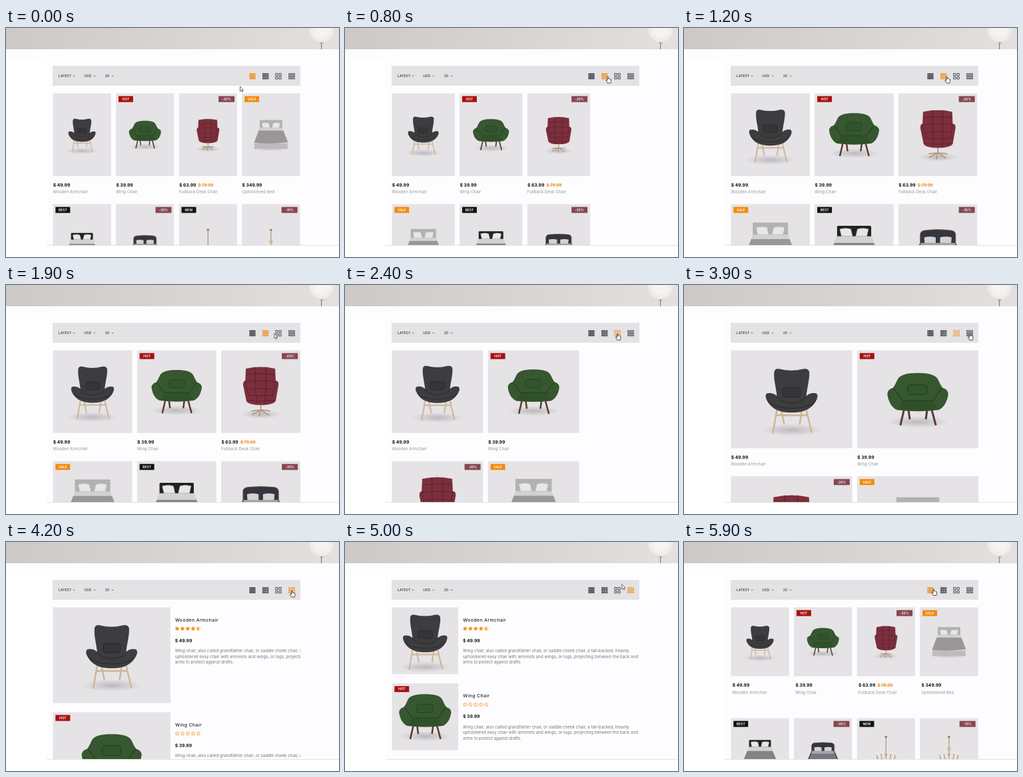
These frames come from a looping animation (500 px wide and 345 px high, 6000 ms). An HTML page:

```html
<!DOCTYPE html>
<html lang="en">
<head>
<meta charset="utf-8">
<title>Shop grid views</title>
<style>
html, body { margin: 0; width: 100%; height: 100%; overflow: hidden; background: #fdfcfe; }
svg { display: block; }
#stage { width: 500px; height: 345px; font-family: Inter, "Open Sans", sans-serif; }
.price { font-size: 6.7px; font-weight: 700; fill: #111; }
.old { font-size: 6.2px; font-weight: 600; fill: #f08a1c; text-decoration: line-through; }
.name { font-size: 5.8px; letter-spacing: .2px; fill: #929094; }
.title { font-size: 6.8px; letter-spacing: .42px; font-weight: 500; fill: #222; }
.desc { font-size: 6.2px; fill: #77757a; }
.tag { font-size: 5px; font-weight: 600; fill: #fff; text-anchor: middle; }
.tool { font-size: 5px; letter-spacing: .1px; font-weight: 500; fill: #333; }
</style>
</head>
<body>
<svg id="stage" viewBox="0 0 500 345">
  <defs>
    <linearGradient id="wall">
      <stop offset="0" stop-color="#cec9c6"/><stop offset=".5" stop-color="#d8d4d1"/><stop offset="1" stop-color="#e3e0de"/>
    </linearGradient>
    <radialGradient id="globe"><stop offset=".5" stop-color="#f6f4f2"/><stop offset="1" stop-color="#ebe8e6"/></radialGradient>
    <radialGradient id="soft"><stop offset="0" stop-color="#77757a" stop-opacity=".38"/><stop offset="1" stop-color="#77757a" stop-opacity="0"/></radialGradient>
    <clipPath id="view"><rect x="62" y="88" width="380.5" height="239.5"/></clipPath>

    <g id="armchair">
      <ellipse cx="0" cy="46" rx="46" ry="9" fill="url(#soft)"/>
      <path d="M-22 16L-28 51M22 16L30 50M-15 18L-11 38M15 18L12 38M-23 24H23" fill="none" stroke="#cfb593" stroke-width="2.4"/>
      <path d="M-26 -41Q-25 -47 -18 -45.5Q0 -41 17 -45.5Q25 -47 26.5 -41C27 -29 23 -17 22 -5Q28 -11 37 -9Q41 -5 36 3C30 14 19 20 0 20S-30 14 -36 3Q-41 -5 -37 -9Q-28 -11 -22 -5C-23 -17 -27 -29 -26 -41Z" fill="#3d3d40"/>
      <path d="M-22 -5C-17 9 17 9 22 -5M-36 2C-26 17 26 17 36 2" fill="none" stroke="#2b2b2d" stroke-width="1.2"/>
      <rect x="-13" y="-18" width="26" height="14.5" rx="4" fill="#353538" stroke="#262628" stroke-width=".8"/>
    </g>
    <g id="green">
      <ellipse cx="0" cy="34" rx="46" ry="9" fill="url(#soft)"/>
      <path d="M-20 13L-26 39M20 13L27 39M-14 15L-12 30M14 15L12 30" stroke="#5d3a2e" stroke-width="3" fill="none"/>
      <path d="M-31 -28C-28 -37 -16 -39.5 0 -39.5S28 -37 31 -28Q34 -21 37 -17Q45 -15 45.5 -8C44 4 39 12 31 16Q0 20 -31 16C-39 12 -44 4 -45.5 -8Q-45 -15 -37 -17Q-34 -21 -31 -28Z" fill="#36572f"/>
      <path d="M-37 -17C-29 -9 -26 -3 -23 2H23C26 -3 29 -9 37 -17" fill="none" stroke="#27451f" stroke-width="1.5"/>
      <path d="M-23 3H23L29 15Q0 19 -29 15Z" fill="#2f5029"/>
      <rect x="-15" y="-22" width="29" height="15" rx="5" fill="#31542c" stroke="#223d1e"/>
    </g>
    <g id="red">
      <ellipse cx="0" cy="41" rx="36" ry="8" fill="url(#soft)"/>
      <path d="M0 22V33L-16 42M0 33L15 43M0 33L-3 45M0 33L17 35M0 33L-17 35" fill="none" stroke="#b69879" stroke-width="2.2"/>
      <path d="M-27 -42Q0 -48 26 -42L27 -20Q33 -20 32 -12L27 17Q22 24 0 24T-26 17L-32 -12Q-32 -20 -28 -20Z" fill="#7c2f3c"/>
      <path d="M-10 -45L-9 8M9 -45L9 8M-27 -31Q0 -35 26 -31M-28 -18Q0 -22 27 -18M-22 -4Q0 -8 22 -4M-28 -19L-22 7H22L27 -19M-8 8V23M8 8V23M-25 16Q0 18 25 16" fill="none" stroke="#5d1f2b" stroke-width="1.1"/>
    </g>
    <g id="sheets">
      <ellipse cx="0" cy="38" rx="56" ry="9" fill="url(#soft)"/>
      <path d="M-31 -18H31L47 22V40H-47V22Z" fill="#d9d8d9"/>
      <path d="M-47 25H47V40H-47Z" fill="#bdbbbd"/>
      <path d="M-32 -20H32L36 -9H-36Z" fill="#d3d1d1"/>
      <path d="M-26 -33Q-15 -36 -6 -33L-3 -20H-23ZM26 -33Q15 -36 6 -33L3 -20H23Z" fill="#e8e7e8" stroke="#bab8ba" stroke-width=".7"/>
    </g>
    <g id="greybed">
      <rect x="-32" y="-42" width="64" height="30" fill="#b3b1b1"/>
      <use href="#sheets"/>
      <path d="M-35 -12H35L48 21Q0 28 -48 23Z" fill="#9a9796"/>
    </g>
    <g id="blackbed">
      <rect x="-31" y="-36" width="62" height="26" rx="2" fill="#222225"/>
      <use href="#sheets" y="3"/>
      <path d="M-36 -5H36L48 24Q0 31 -48 24Z" fill="#858388"/>
    </g>
    <g id="navybed">
      <path d="M-32 0V-21Q-31 -28 -20 -28Q0 -30 20 -28Q31 -28 32 -21V0Z" fill="#35353f" stroke="#6b4a42" stroke-width="1.3"/>
      <path d="M-33 -4H33L46 25V38H-46V25Z" fill="#46454f"/>
      <path d="M-25 -15Q-14 -18 -4 -15V-4H-24ZM25 -15Q14 -18 4 -15V-4H24Z" fill="#d2d1d4"/>
      <path d="M-31 -5H31L33 3H-33Z" fill="#a5a3a9"/>
      <path d="M-33 3H33L44 25H-44Z" fill="#77757d"/>
    </g>
    <g id="lamp">
      <path d="M0 -47V30" stroke="#a98b60" stroke-width="2"/>
      <path d="M-4 -47H4L2 -42H-2Z" fill="#8f744d"/>
      <path d="M0 24C-12 30 -26 22 -26 6M0 24C12 30 26 22 26 6M0 20C-8 25 -14 16 -14 3M0 20C8 25 14 16 14 3" fill="none" stroke="#ad8f62" stroke-width="2"/>
      <path d="M-26 6V-4M-14 3V-7M14 3V-7M26 6V-4" stroke="#f3ead8" stroke-width="4"/>
      <path d="M-26 12V24M-14 16V30M0 28V40M14 16V30M26 12V24" stroke="#b9b3aa" stroke-width="2" stroke-dasharray="2 1.5"/>
      <circle cy="6" r="4" fill="#c7ab7c"/>
    </g>
    <g id="glow"><use href="#lamp"/><circle cy="-11" r="5" fill="#d2b98c"/></g>
  </defs>

  <rect width="500" height="345" fill="#fdfcfe"/>
  <rect width="500" height="32" fill="url(#wall)"/>
  <circle cx="474" cy="3" r="18.5" fill="url(#globe)"/>
  <path d="M471 21.5H477L475.5 24H472.5Z" fill="#b9b2ab"/>
  <path d="M473.6 23V32" stroke="#77706b"/>
  <path d="M0 50H55Q61 50 61 56V345H0Z" fill="#fff"/>
  <rect x="61" y="327.5" width="439" height="18" fill="#fff"/>
  <rect x="70" y="57" width="372" height="30" fill="#e4e2e4"/>
  <g id="tools"></g>
  <g id="icons"></g>
  <g id="cards" clip-path="url(#view)"></g>
  <path d="M61 327.5H500" stroke="#e2e1e4"/>
  <g id="cursor">
    <path id="arrow" d="M0 0V7.4L1.7 5.9L2.9 8.4L4 7.9L2.9 5.5H5.1Z" fill="#fff" stroke="#333" stroke-width=".7"/>
    <path id="hand" d="M0 .8Q.8 -.4 1.4 .8V3.4Q2.4 2.8 2.9 3.7Q3.9 3.2 4.3 4.1Q5.5 3.8 5.5 5.2V7.4L4.6 10H.4L-1.9 6.4Q-2.1 5 -.9 5.3L0 6.2Z" fill="#fff" stroke="#222" stroke-width=".8"/>
  </g>
</svg>
<script>
const NS = "http://www.w3.org/2000/svg";
const $ = id => document.getElementById(id);
const RED = "#a80f10", WINE = "#86464f", ORANGE = "#f28a0e", BLACK = "#111", DARK = "#2c3038";
const LEFT = 70, TOP = 98, GAP = 7, WIDE = 379.5, SPEED = 600, LOOP = 6000;
const CLICK = { three: 700, two: 2283, list: 4150, four: 5825 };

function add(parent, tag, attrs = {}, text) {
  const el = document.createElementNS(NS, tag);
  set(el, attrs);
  if (text) el.textContent = text;
  parent.appendChild(el);
  return el;
}
function set(el, attrs) {
  for (const k in attrs) el.setAttribute(k, attrs[k]);
}
const show = (el, on) => el.setAttribute("display", on ? "inline" : "none");
const mix = (a, b, p) => a + (b - a) * p;

// cubic-bezier(.25, .1, .25, 1)
function ease(p) {
  if (p <= 0) return 0;
  if (p >= 1) return 1;
  let lo = 0, hi = 1, u;
  for (let i = 0; i < 20; i++) {
    u = (lo + hi) / 2;
    const x = .75 * u * (1 - u) + u ** 3;
    if (x < p) lo = u; else hi = u;
  }
  return .3 * u * (1 - u) ** 2 + 3 * u * u * (1 - u) + u ** 3;
}

// Toolbar
for (const [x, label, arrow] of [[79, "LATEST", 102], [117.3, "USD", 133], [148.7, "20", 160]]) {
  add($("tools"), "text", { x, y: 74, class: "tool" }, label);
  add($("tools"), "path", { d: `M${arrow - 1.3} 71.7l1.3 1.3l1.3 -1.3`, fill: "none", stroke: "#555", "stroke-width": .8 });
}
function gridPath(cx, n, size, step) {
  const start = -(step * (n - 1) + size) / 2;
  let d = "";
  for (let r = 0; r < n; r++)
    for (let c = 0; c < n; c++)
      d += `M${cx + start + c * step} ${72.7 + start + r * step}h${size}v${size}h${-size}z`;
  return d;
}
const bars = [0, 1, 2].map(i => `M424.5 ${68.7 + i * 3.2}h9v1.6h-9z`).join("");
const icons = [
  [gridPath(370, 4, 1.5, 2.3), .5], [gridPath(389.7, 3, 2, 3.2), .9],
  [gridPath(409, 2, 3.3, 5.2), .8], [bars, .8]
].map(([d, w]) => add($("icons"), "path", { d, "stroke-width": w }));

// Products
const TEXT = [
  "Wing chair, also called grandfather chair, or saddle cheek chair, a tall-backed, heavily",
  "upholstered easy chair with armrests and wings, or lugs, projecting between the back and",
  "arms to protect against drafts."
];
const goods = [
  { art: "armchair", name: "Wooden Armchair", price: "$ 49.99", stars: 4.5 },
  { art: "green", name: "Wing Chair", price: "$ 39.99", tag: "HOT", fill: RED, stars: 0 },
  { art: "red", name: "Fullback Desk Chair", price: "$ 63.99", old: "$ 79.99", tag: "-20%", fill: WINE },
  { art: "greybed", name: "Upholstered Bed", price: "$ 349.99", tag: "SALE", fill: ORANGE },
  { art: "blackbed", tag: "BEST", fill: BLACK },
  { art: "navybed", tag: "-35%", fill: WINE },
  { art: "lamp", tag: "NEW", fill: BLACK },
  { art: "glow", tag: "-15%", fill: WINE }
];
function starPath(cx, cy, half) {
  const pts = [];
  for (let i = 0; i <= (half ? 5 : 9); i++) {
    const r = i % 2 ? 1.4 : 3.2, a = -Math.PI / 2 - i * Math.PI / 5;
    pts.push(`${(cx + r * Math.cos(a)).toFixed(2)} ${(cy + r * Math.sin(a)).toFixed(2)}`);
  }
  return `M${pts.join("L")}Z`;
}
const cards = goods.map(g => {
  const root = add($("cards"), "g");
  const pic = add(root, "svg", { overflow: "hidden" });
  add(pic, "rect", { width: "100%", height: "100%", fill: "#e5e3e6" });
  const art = add(pic, "use", { href: "#" + g.art });

  const tag = add(root, "g");
  const right = g.tag && g.tag[0] === "-", tw = right ? 24 : 22;
  if (g.tag) {
    add(tag, "rect", { width: tw, height: 9, fill: g.fill });
    add(tag, "text", { x: tw / 2, y: 6.3, class: "tag" }, g.tag);
  }

  const info = add(root, "g");
  if (g.name) {
    add(info, "text", { x: .5, y: 15.6, class: "price" }, g.price);
    if (g.old) add(info, "text", { x: 29, y: 15.5, class: "old" }, g.old);
    add(info, "text", { x: .3, y: 26.1, class: "name" }, g.name);
  }

  const row = add(root, "g");
  if ("stars" in g) {
    add(row, "text", { x: 7, y: 21.4, class: "title" }, g.name);
    for (let i = 0; i < 5; i++) {
      const x = 10 + i * 8, left = g.stars - i;
      add(row, "path", { d: starPath(x, 32.3), fill: left >= 1 ? ORANGE : "none", stroke: ORANGE, "stroke-width": .6 });
      if (left === .5) add(row, "path", { d: starPath(x, 32.3, true), fill: ORANGE });
    }
    add(row, "text", { x: 6.8, y: 52.3, class: "price" }, g.price);
    TEXT.forEach((line, i) => add(row, "text", { x: 6.8, y: 67.8 + i * 8.7, class: "desc" }, line));
  }
  return { root, pic, art, tag, info, row, right, tw };
});

function layout(t) {
  const since = at => ease((t - at) / SPEED);
  const s = { active: 0, w: 87.6, h: 125, zoom: .53, shift: 0, list: false };
  if (t >= CLICK.four) {
    const p = since(CLICK.four);
    s.h = mix(101, 125, p);
    s.shift = 2.3 * (1 - p);
  } else if (t >= CLICK.list) {
    const p = since(CLICK.list);
    Object.assign(s, { active: 3, list: true, w: mix(182.5, 100, p), h: mix(147.8, 101, p), zoom: mix(1, .86, p) });
  } else if (t >= CLICK.two) {
    s.active = 2;
    s.w = mix(119.3, 182.5, since(CLICK.two));
    s.h = Math.max(125, s.w / 1.235);
    s.zoom = s.h / 147;
  } else if (t >= CLICK.three) {
    const p = since(CLICK.three);
    Object.assign(s, { active: 1, w: mix(87.6, 119.3, p), zoom: mix(.53, .83, p) });
  }
  s.cols = s.list ? 1 : Math.floor(WIDE / (s.w + GAP));
  s.pitch = s.list ? s.h + 13.5 : Math.max(167, s.h + 42);
  return s;
}

// time, x, y of the pointer tip
const path = [
  [0, 351.5, 88], [500, 394, 73], [1700, 394, 73], [2050, 408.5, 73], [3400, 408.5, 73],
  [3750, 428.5, 73], [4600, 428.5, 73], [5000, 415.7, 63.7], [5550, 374, 70.5], [6000, 374, 70.5]
];
function pointer(t) {
  const i = path.findIndex(p => p[0] > t);
  const [t0, x0, y0] = path[i - 1], [t1, x1, y1] = path[i];
  const u = (t - t0) / (t1 - t0), p = u * u * (3 - 2 * u);
  return [mix(x0, x1, p), mix(y0, y1, p)];
}

function draw(t) {
  const s = layout(t);
  cards.forEach((c, i) => {
    const x = LEFT + .3 + (i % s.cols) * (s.w + GAP);
    const y = TOP + .3 + Math.floor(i / s.cols) * s.pitch;
    show(c.root, y < 327);
    set(c.root, { transform: `translate(${x} ${y})` });
    set(c.pic, { width: s.w, height: s.h });
    set(c.art, { transform: `translate(${s.w / 2} ${s.h / 2}) scale(${s.zoom})` });
    set(c.tag, { transform: `translate(${c.right ? s.w - c.tw - 4 : 4} 4.3)` });
    set(c.info, { transform: `translate(${s.shift} ${s.h})` });
    set(c.row, { transform: `translate(${s.w} 0)` });
    show(c.info, !s.list);
    show(c.row, s.list);
  });
  icons.forEach((el, i) => {
    const color = i === s.active ? ORANGE : DARK;
    set(el, { stroke: color, fill: i === 0 ? color : "none" });
  });
  const [x, y] = pointer(t);
  const over = y > 66 && y < 80 && [370, 389.7, 409, 429].some(cx => Math.abs(x - cx) < 6);
  set($("cursor"), { transform: `translate(${x} ${y})` });
  show($("hand"), over);
  show($("arrow"), !over);
}

const start = performance.now();
function tick() {
  const t = (performance.now() - start) % LOOP;
  draw(Math.floor(t / 100) * 100);
  requestAnimationFrame(tick);
}
tick();
</script>
</body>
</html>
```
